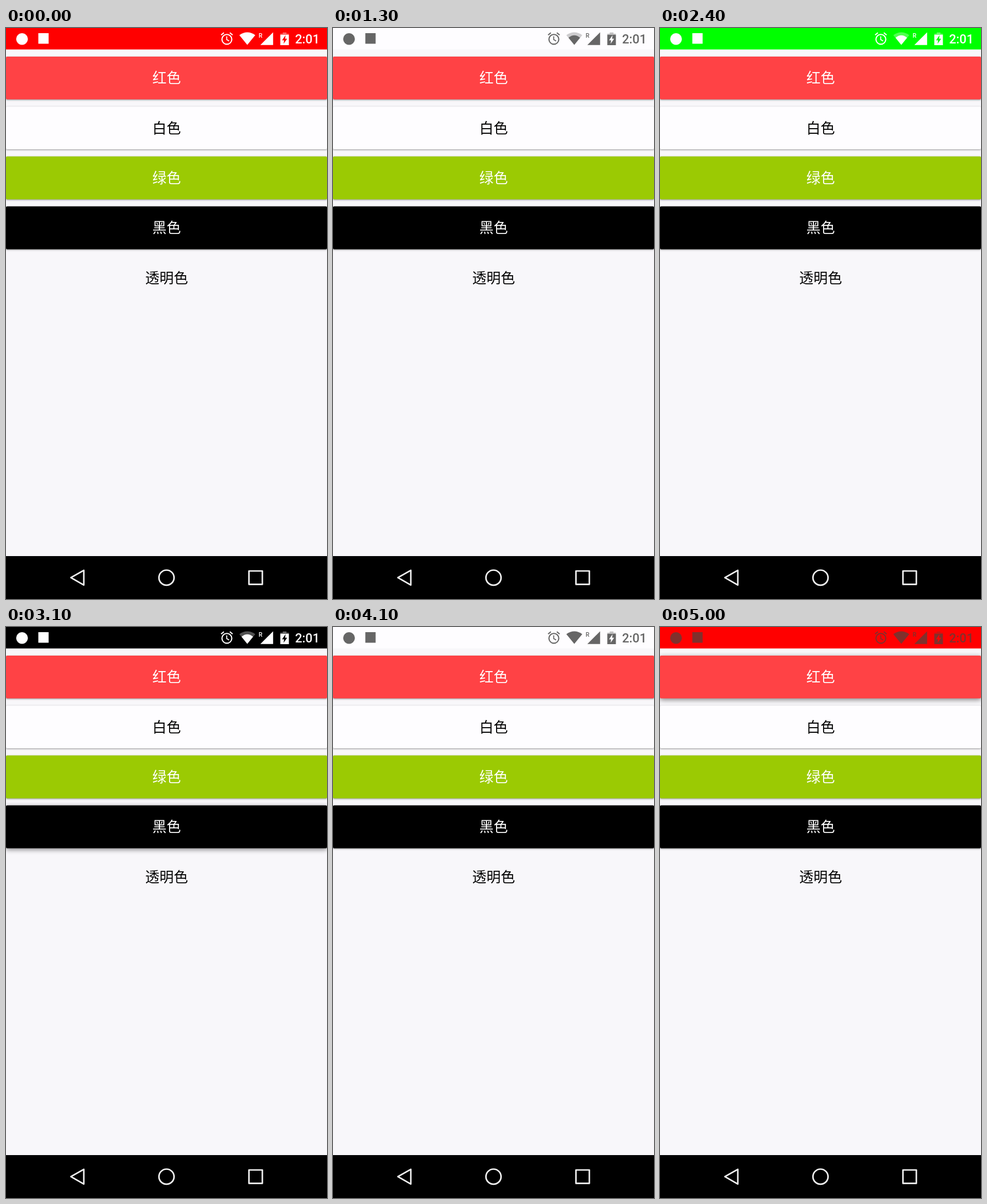
These frames come from a looping animation (561 px wide and 998 px high, 5100 ms). An HTML page with a canvas:

```html
<!DOCTYPE html>
<html lang="zh-CN">
<head>
<meta charset="utf-8">
<title>Status bar colours</title>
<style>
  html, body { margin: 0; width: 100%; height: 100%; overflow: hidden; background: #f8f7fa; }
  canvas { display: block; width: 561px; height: 998px; }
</style>
</head>
<body>
<canvas id="stage"></canvas>
<script>
const W = 561, H = 998, LOOP = 5100;
const canvas = document.getElementById('stage');
const ctx = canvas.getContext('2d');
const dpr = window.devicePixelRatio || 1;
canvas.width = Math.round(W * dpr);
canvas.height = Math.round(H * dpr);

const GREY = '#666666';
const BAR_H = 37.5;
const buttons = [
  { label: '红色', fill: '#ff4245', ink: '#ffffff' },
  { label: '白色', fill: '#fefdff', ink: '#000000' },
  { label: '绿色', fill: '#9bca03', ink: '#ffffff' },
  { label: '黑色', fill: '#000000', ink: '#ffffff' }
];

// Start time, bar colour, icon colour, pressed button, lift 0..1
const steps = [
  [0, '#ff0000', '#ffffff', -1, 0],
  [1000, '#fefdff', '#eeeeee', 1, 1],
  [1100, '#fefdff', '#9a9a9a', 1, 0.7],
  [1200, '#fefdff', GREY, 1, 0.3],
  [1300, '#fefdff', GREY, -1, 0],
  [2200, '#00ff00', '#237d1e', 2, 1],
  [2300, '#00ff00', '#ffffff', 2, 0.5],
  [2400, '#00ff00', '#ffffff', -1, 0],
  [3100, '#000000', '#ffffff', 3, 1],
  [3200, '#000000', '#ffffff', 3, 0.5],
  [3300, '#000000', '#ffffff', -1, 0],
  [4000, '#fefdff', '#b0b0b0', 1, 0.6],
  [4100, '#fefdff', GREY, -1, 0],
  [4900, '#ff0000', '#80302c', 0, 0.6],
  [5000, '#ff0000', '#80302c', 0, 1]
];

function poly(points) {
  ctx.beginPath();
  points.forEach(([x, y]) => ctx.lineTo(x, y));
  ctx.closePath();
}

function circle(x, y, r) {
  ctx.beginPath();
  ctx.arc(x, y, r, 0, Math.PI * 2);
}

function line(x1, y1, x2, y2) {
  ctx.beginPath();
  ctx.moveTo(x1, y1);
  ctx.lineTo(x2, y2);
  ctx.stroke();
}

function text(str, x, y, font, color, align) {
  ctx.font = font;
  ctx.fillStyle = color;
  ctx.textAlign = align;
  ctx.fillText(str, x, y);
}

function drawAlarm() {
  ctx.lineWidth = 2.1;
  circle(386, 19.8, 8.6);
  ctx.stroke();
  line(376, 12.2, 380.8, 8.2);
  line(396, 12.2, 391.2, 8.2);
  ctx.lineWidth = 1.7;
  ctx.beginPath();
  ctx.moveTo(385.7, 14.5);
  ctx.lineTo(385.7, 20.2);
  ctx.lineTo(390, 22.8);
  ctx.stroke();
}

function fan(left, right, top, bow) {
  ctx.beginPath();
  ctx.moveTo(421.7, 29.5);
  ctx.lineTo(left, top);
  ctx.quadraticCurveTo(421.7, top - bow, right, top);
  ctx.closePath();
  ctx.fill();
}

function drawWifi(full) {
  ctx.globalAlpha = full ? 1 : 0.32;
  fan(407.8, 435.6, 12.4, 9.8);
  ctx.globalAlpha = 1;
  if (!full) fan(411.6, 431.8, 17.1, 8.6);
}

function drawBattery(bar, ink) {
  ctx.globalAlpha = 0.4;
  ctx.fillRect(483.6, 7.8, 6.6, 2.4);
  ctx.fillRect(479.4, 10, 15, 2);
  ctx.globalAlpha = 1;
  ctx.fillRect(479.4, 12, 15, 18);
  ctx.fillStyle = bar;
  poly([[488.6, 12.6], [482.4, 21.4], [486, 21.4], [485.2, 27.6], [491.4, 18.8], [487.8, 18.8]]);
  ctx.fill();
  ctx.fillStyle = ink;
}

function drawStatus(bar, ink, fullWifi) {
  ctx.fillStyle = bar;
  ctx.fillRect(0, 0, W, BAR_H);
  ctx.fillStyle = ctx.strokeStyle = ink;
  circle(28, 19.2, 10.2);
  ctx.fill();
  ctx.fillRect(56.5, 9, 18, 18.5);
  drawAlarm();
  drawWifi(fullWifi);
  poly([[444.5, 29.7], [466.8, 29.7], [466.8, 7.5]]);
  ctx.fill();
  drawBattery(bar, ink);
  text('R', 441.4, 16.8, '500 10.5px Roboto, sans-serif', ink, 'left');
  text('2:01', 505.2, 27, '500 21.8px Roboto, sans-serif', ink, 'left');
}

function label(str, mid, color) {
  text(str, 280.7, mid + 9, '24.9px "Noto Sans CJK SC", "Noto Sans CJK", sans-serif', color, 'center');
}

function drawButton(button, i, lift) {
  const top = 49.9 + i * 87.3;
  ctx.save();
  ctx.shadowColor = `rgba(0,0,0,${0.42 + 0.06 * lift})`;
  ctx.shadowBlur = (3 + 5 * lift) * dpr;
  ctx.shadowOffsetY = (1 + 1.4 * lift) * dpr;
  ctx.fillStyle = button.fill;
  ctx.beginPath();
  ctx.roundRect(0, top, W, 74.9, 2);
  ctx.fill();
  ctx.restore();
  label(button.label, top + 37.5, button.ink);
}

function drawNav() {
  ctx.fillStyle = '#000000';
  ctx.fillRect(0, 923, W, H - 923);
  ctx.strokeStyle = '#f0f0f0';
  ctx.lineWidth = 2.7;
  ctx.lineJoin = 'round';
  poly([[113.4, 960.7], [136, 947.8], [136, 973.6]]);
  ctx.stroke();
  circle(280.5, 960.7, 13.2);
  ctx.stroke();
  ctx.strokeRect(424.6, 949, 23.4, 23.4);
  ctx.lineJoin = 'miter';
}

function draw(t) {
  const [, bar, ink, pressed, lift] = steps.filter(s => s[0] <= t).pop();
  ctx.setTransform(dpr, 0, 0, dpr, 0, 0);
  ctx.fillStyle = '#f8f7fa';
  ctx.fillRect(0, 0, W, H);
  buttons.forEach((b, i) => drawButton(b, i, i === pressed ? lift : 0));
  label('透明色', 436.7, '#000000');
  drawStatus(bar, ink, t < 700 || t >= 3700);
  drawNav();
}

const start = performance.now();
function tick() {
  draw((performance.now() - start) % LOOP);
  requestAnimationFrame(tick);
}
tick();
</script>
</body>
</html>
```
